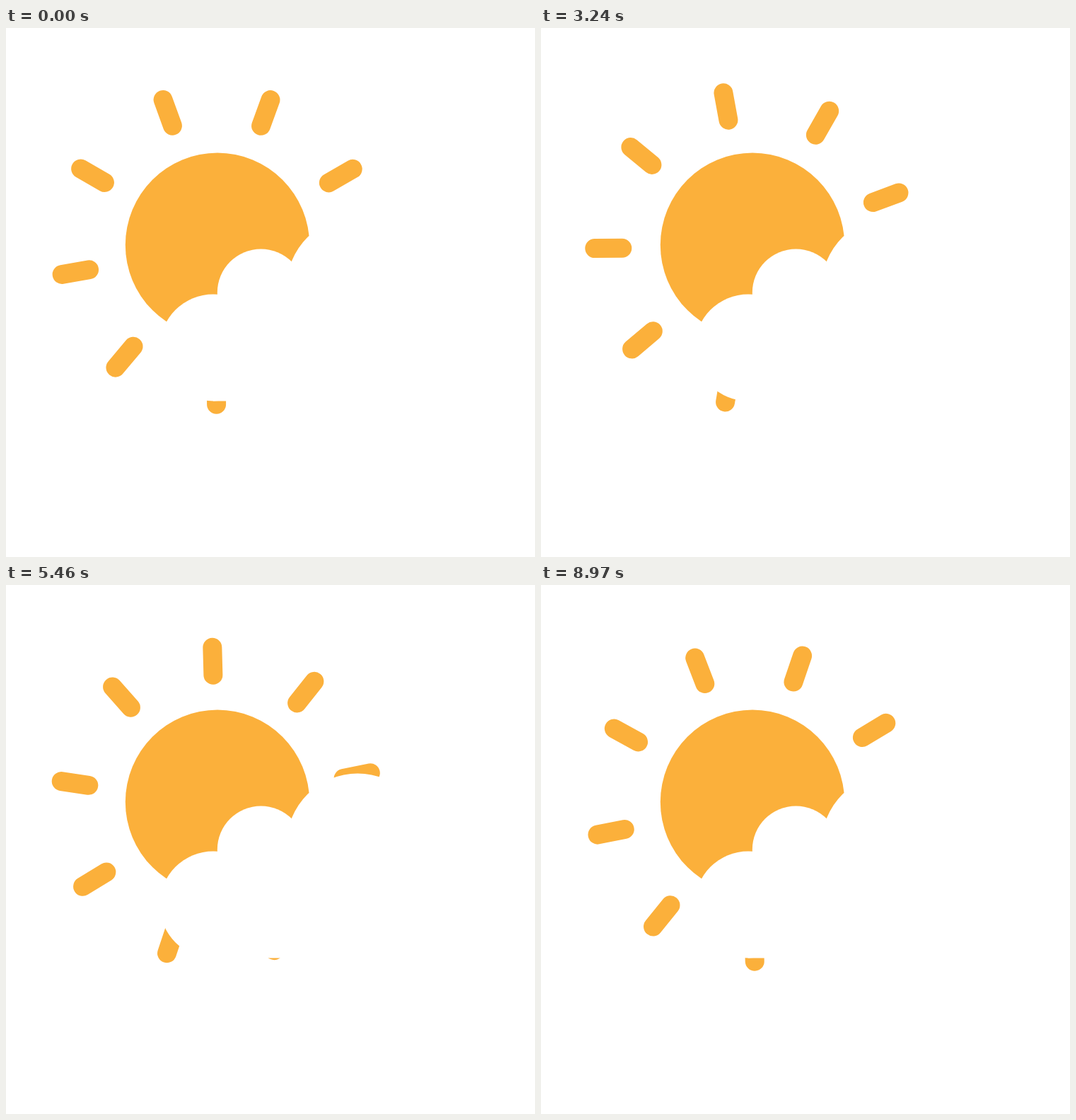
These frames come from a looping animation (748x748 px, 9 s). An HTML page with a canvas:

```html
<!DOCTYPE html>
<html lang="en">
<head>
<meta charset="utf-8">
<title>Sun and cloud</title>
<style>
  html, body { margin: 0; width: 100%; height: 100%; overflow: hidden; background: #fff; }
  canvas { display: block; width: 748px; height: 748px; }
</style>
</head>
<body>
<canvas id="stage" width="748" height="748"></canvas>
<script>
const ctx = document.getElementById('stage').getContext('2d');
const LOOP = 9000;
const STEP = 30;
const RAYS = 9;
const SUN = '#fbb03b';
const CLOUD = '#fff';

function disc(x, y, r, color) {
  ctx.fillStyle = color;
  ctx.beginPath();
  ctx.arc(x, y, r, 0, Math.PI * 2);
  ctx.fill();
}

function drawRays(turn) {
  ctx.save();
  ctx.translate(297.8, 310.2);
  ctx.rotate(turn);
  ctx.strokeStyle = SUN;
  ctx.lineWidth = 27;
  ctx.lineCap = 'round';
  ctx.beginPath();
  for (let i = 0; i < RAYS; i++) {
    // The first ray points straight down.
    const a = Math.PI / 2 + i * Math.PI * 2 / RAYS;
    const x = Math.cos(a), y = Math.sin(a);
    ctx.moveTo(x * 183, y * 183);
    ctx.lineTo(x * 222, y * 222);
  }
  ctx.stroke();
  ctx.restore();
}

function drawCloud() {
  disc(293, 452, 75.5, CLOUD);
  disc(360.5, 374.2, 61.7, CLOUD);
  disc(497.2, 367, 100.4, CLOUD);
  ctx.fillRect(293, 380, 300, 147.5);
}

function draw(now) {
  const t = Math.floor((now % LOOP) / STEP) * STEP;
  ctx.fillStyle = '#fff';
  ctx.fillRect(0, 0, 748, 748);
  disc(299, 306.8, 130.2, SUN);
  drawRays(t / LOOP * Math.PI * 2 + 0.001);
  drawCloud();
}

let start = null;
function tick(now) {
  if (start === null) start = now;
  draw(now - start);
  requestAnimationFrame(tick);
}
draw(0);
requestAnimationFrame(tick);
</script>
</body>
</html>
```
